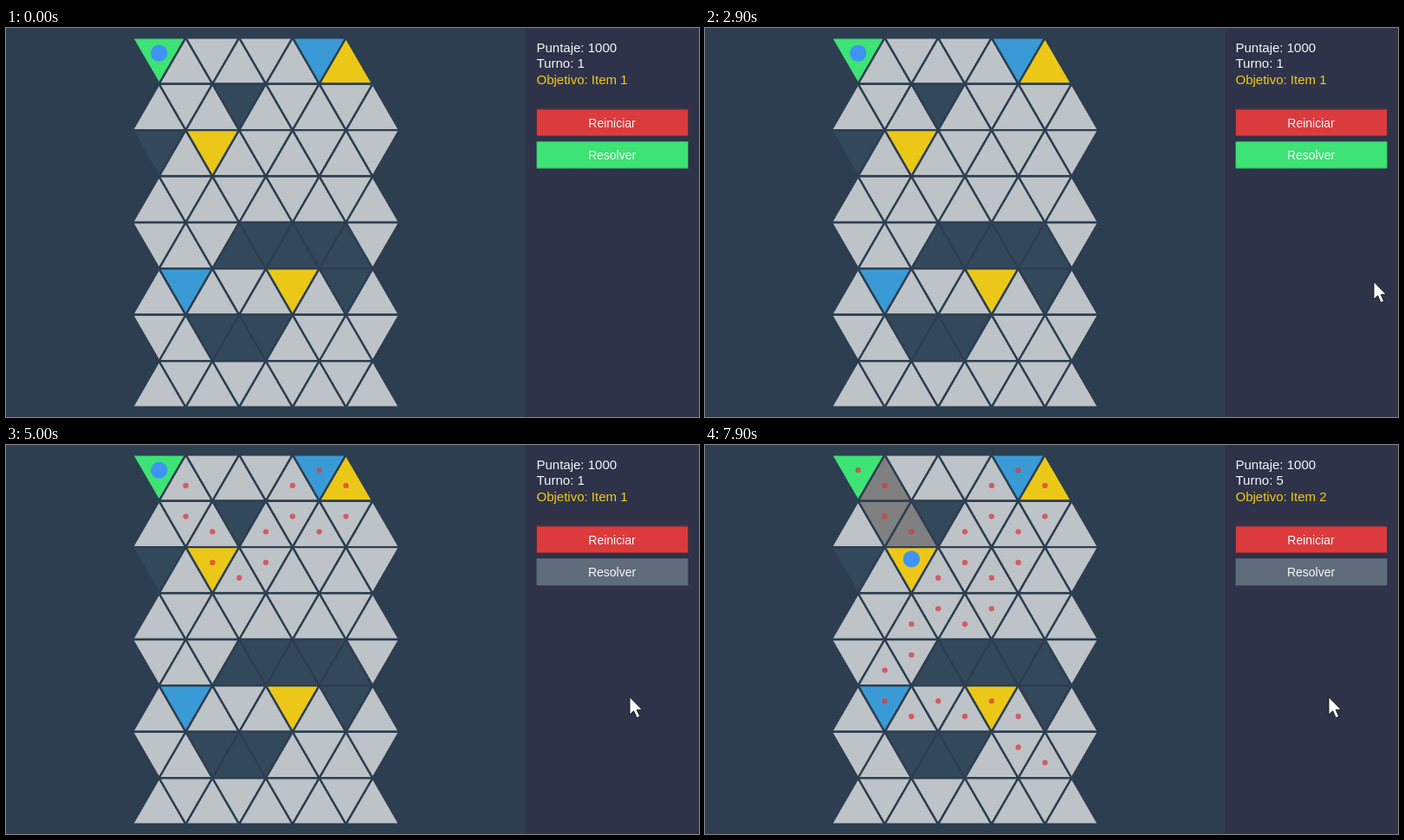
These frames come from a looping animation (800 by 450 pixels, 8000 ms). An HTML page:

```html
<!DOCTYPE html>
<html lang="es">
<head>
<meta charset="utf-8">
<title>Laberinto triangular</title>
<style>
  html, body { margin: 0; width: 100%; height: 100%; overflow: hidden; background: #2c3e50; }
  svg { display: block; width: 100vw; height: 100vh; }
  text { font-family: "Liberation Sans", Arial, sans-serif; font-size: 15px; fill: #f6f7f8; }
  .label { font-size: 14px; text-anchor: middle; }
  .edge { fill: none; stroke: #14181f; stroke-opacity: .55; stroke-dasharray: 1 1; }
</style>
</head>
<body>
<svg viewBox="0 0 800 450">
  <rect width="800" height="450" fill="#2c3e50"/>
  <g id="cells" stroke="#2c3e50" stroke-width="2.4"></g>
  <g id="dots" fill="#dc3a3e" fill-opacity=".75"></g>
  <circle id="player" r="9.7" fill="#4094f5"/>
  <rect x="600" width="200" height="450" fill="#2e3349"/>
  <text x="612.5" y="27.5">Puntaje: 1000</text>
  <text id="turn" x="612.5" y="46.3"></text>
  <text id="goal" x="612.5" y="65" style="fill:#f3cb18"></text>
  <rect x="612.5" y="93.75" width="175" height="31.25" fill="#db3b3d"/>
  <rect class="edge" x="612.5" y="94.5" width="175" height="30"/>
  <text class="label" x="699.5" y="114.5">Reiniciar</text>
  <rect id="solve" x="612.5" y="131.25" width="175" height="31.25"/>
  <rect id="solveEdge" class="edge" x="612.5" y="131.5" width="175" height="30.5" style="stroke-opacity:.25"/>
  <text class="label" x="699.5" y="152">Resolver</text>
  <path id="cursor" d="M0 0V20.5L4.7 16.2L8.2 24.2L11.8 22.6L8.3 14.8H14.5Z" fill="#fff" stroke="#15171c" stroke-width="1"/>
</svg>
<script>
const $ = id => document.getElementById(id);
const LOOP = 8000, STEP = 100;
const LEFT = 176.7, TOP = 11.3, HALF = 30.83, ROW = 53.42;

const COLORS = { wall: '#34485c', item: '#ebc817', portal: '#3a9ad6', start: '#3de375', floor: '#bdc3c7' };
const SPECIAL = {
  start: ['00'],
  portal: ['06', '51'],
  item: ['07', '22', '55'],
  wall: ['13', '20', '43', '44', '45', '46', '47', '57', '62', '63', '64']
};
// Each entry is a row digit followed by a column digit.
const ROUTE = ('00 01 11 12 22 23 24 14 15 05 06 07 17 16 26 25 35 34 33 32 ' +
  '42 41 51 52 53 54 55 56 66 67').split(' ');

const CLICK = 4100, DOTS_FROM = 4140, DOT_EVERY = 65;
const MOVE_FROM = 6540, MOVE_TIME = 350;
// time, x, y of the pointer tip
const POINTER = [
  [2200, 801, 345], [2500, 788, 314], [2900, 772, 293.5], [3000, 770, 288],
  [3400, 735, 158], [3600, 731, 149], [4200, 731, 149], [4700, 720, 291.5]
];

const isDown = (r, c) => (r + c) % 2 === 0;
const center = id => {
  const [r, c] = [...id].map(Number);
  return [LEFT + c * HALF, TOP + ROW * (r + (isDown(r, c) ? 1 : 2) / 3)];
};
const kind = id => Object.keys(SPECIAL).find(k => SPECIAL[k].includes(id)) || 'floor';
const add = (parent, tag, attrs) => {
  const el = document.createElementNS(parent.namespaceURI, tag);
  for (const k in attrs) el.setAttribute(k, attrs[k]);
  return parent.appendChild(el);
};

const cells = {};
for (let r = 0; r < 8; r++) {
  for (let c = 0; c < (r ? 9 : 8); c++) {
    const x = LEFT + c * HALF, y = TOP + r * ROW;
    const [base, tip] = isDown(r, c) ? [y, y + ROW] : [y + ROW, y];
    cells[`${r}${c}`] = add($('cells'), 'polygon', {
      points: `${x - 2 * HALF / 2},${base} ${x + HALF},${base} ${x},${tip}`
    });
  }
}
const dots = ROUTE.map(id => {
  const [cx, cy] = center(id);
  return add($('dots'), 'circle', { cx, cy, r: 3.15 });
});

const mix = (a, b, k) => a + (b - a) * k;

function pointerAt(t) {
  const i = POINTER.findIndex(p => p[0] > t);
  if (i === 0) return [820, 345];
  if (i < 0) return POINTER[POINTER.length - 1].slice(1);
  const a = POINTER[i - 1], b = POINTER[i], k = (t - a[0]) / (b[0] - a[0]);
  return [mix(a[1], b[1], k), mix(a[2], b[2], k)];
}

function draw(t) {
  const shown = t < DOTS_FROM ? 0 : Math.floor((t - DOTS_FROM) / DOT_EVERY) + 1;
  dots.forEach((dot, i) => dot.setAttribute('visibility', i < shown ? 'visible' : 'hidden'));

  const progress = Math.max(0, (t - MOVE_FROM) / MOVE_TIME);
  const done = Math.floor(progress);
  const moves = t < MOVE_FROM ? 0 : done + 1;
  const a = center(ROUTE[done]), b = center(ROUTE[done + 1]), k = progress - done;
  $('player').setAttribute('cx', mix(a[0], b[0], k));
  $('player').setAttribute('cy', mix(a[1], b[1], k));

  const visited = ROUTE.slice(0, moves);
  for (const id in cells) {
    const type = kind(id);
    const worn = type === 'floor' && visited.includes(id);
    cells[id].setAttribute('fill', worn ? '#808080' : COLORS[type]);
  }
  $('turn').textContent = `Turno: ${moves + 1}`;
  $('goal').textContent = `Objetivo: Item ${moves >= 4 ? 2 : 1}`;

  const [x, y] = pointerAt(t);
  const hover = x > 612 && x < 788 && y > 131 && y < 163;
  $('solve').setAttribute('fill', t >= CLICK ? '#5f6c7c' : hover ? '#63e990' : '#3de375');
  $('solveEdge').setAttribute('visibility', t >= CLICK ? 'hidden' : 'visible');
  $('cursor').setAttribute('transform', `translate(${x} ${y})`);
}

const origin = performance.now();
function tick() {
  const t = (performance.now() - origin) % LOOP;
  draw(Math.floor(t / STEP) * STEP);
  requestAnimationFrame(tick);
}
tick();
</script>
</body>
</html>
```
